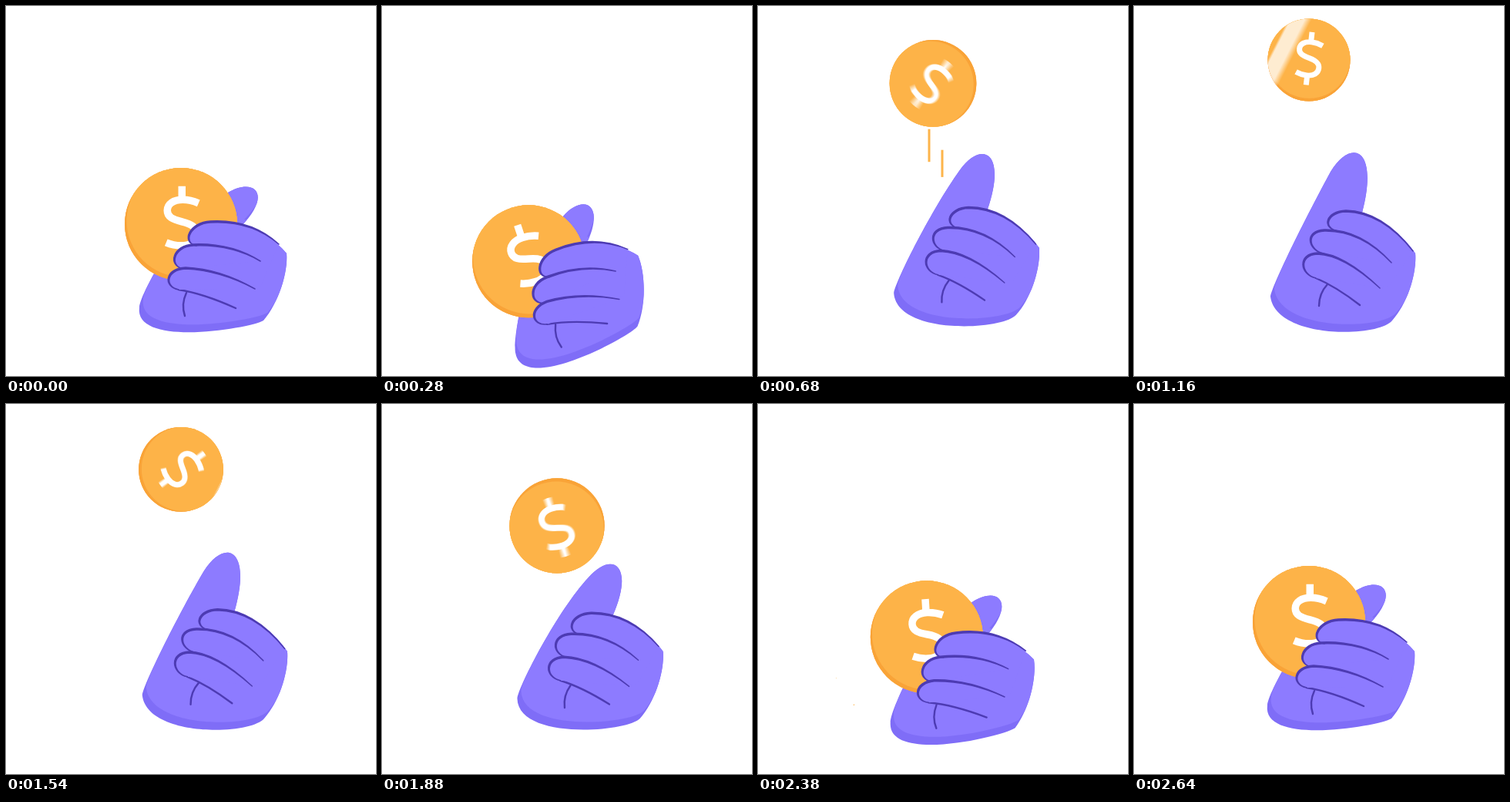
An HTML page for the animation above (2.66 s loop, 480x480 px).

```html
<!DOCTYPE html>
<html lang="en">
<head>
<meta charset="utf-8">
<title>Coin flip</title>
<style>
  html, body { margin: 0; width: 100%; height: 100%; overflow: hidden; background: #fff; }
  svg { display: block; width: 100vw; height: 100vh; }
</style>
</head>
<body>
<svg viewBox="0 0 480 480">
  <defs>
    <clipPath id="disc"><circle r="73"/></clipPath>
    <clipPath id="palm"><path id="outline"/></clipPath>
    <linearGradient id="shine">
      <stop offset="0" stop-color="#fff" stop-opacity="0"/>
      <stop offset=".12" stop-color="#fff" stop-opacity=".75"/>
      <stop offset=".7" stop-color="#fff" stop-opacity=".75"/>
      <stop offset="1" stop-color="#fff" stop-opacity="0"/>
    </linearGradient>
  </defs>
  <g id="trails" stroke="#fdb44b" stroke-width="3"></g>
  <g id="sparks" fill="#fdb44b"></g>
  <g id="back">
    <path id="shade" fill="#7f6df7"/>
    <g clip-path="url(#palm)"><path id="skin" fill="#8d7bff" transform="translate(5 -10)"/></g>
    <path id="crease" fill="none" stroke="#4d3bb3" stroke-width="2.4" stroke-linecap="round"/>
  </g>
  <g id="coin" ><g clip-path="url(#disc)">
    <g id="layers"></g>
    <rect id="glare" x="-21" y="-80" width="42" height="160" fill="url(#shine)"/>
  </g></g>
  <g id="front"></g>
</svg>
<script>
const LOOP = 2660, PEAK = 1120, PIVOT = [326, 415], HELD = [227, 283], R = 73;
const INK = '#4d3bb3', SKIN = '#8d7bff';
// Each half of the flight: length, total turn, and how the grip eases
const RISE = { span: 840, turn: -539, ease: 2.5, rest: 0 };
const FALL = { span: 1022, turn: 282, ease: 3.25, rest: 720 };
const $ = id => document.getElementById(id);

function set(el, attrs) {
  for (const k in attrs) el.setAttribute(k, attrs[k]);
}
function add(parent, tag, attrs) {
  const el = document.createElementNS('http://www.w3.org/2000/svg', tag);
  set(el, attrs);
  parent.appendChild(el);
  return el;
}
const lerp = (a, b, k) => a + (b - a) * k;
const ramp = (t, a, b) => Math.min(1, Math.max(0, (t - a) / (b - a)));
const smooth = (t, a, b) => { const u = ramp(t, a, b); return u * u * (3 - 2 * u); };
const bump = (t, a, top, b) => smooth(t, a, top) * (1 - smooth(t, top, b));

// Blend two path strings with matching commands
function morph(a, b) {
  const num = /-?[\d.]+/g, to = b.match(num).map(Number);
  return k => {
    let i = 0;
    return a.replace(num, n => lerp(+n, to[i++], k).toFixed(2));
  };
}

// A finger runs from its tuck round the tip to the knuckle, then bends to its end
function edge([ax, ay, bx, by, cx, cy, ex, ey], o = 0) {
  return `M${ax} ${ay}C${ax - 20 + o} ${ay - 4} ${bx - 26 + o} ${by + 1 + o} ${bx} ${by + o}Q${cx} ${cy + o} ${ex} ${ey}`;
}
// Thick at the tip, tapering to both ends
function taper(p) {
  const [ax, ay, bx, by, cx, cy] = p;
  return edge(p, -1) + `Q${cx} ${cy + 1} ${bx} ${by + 1}C${bx - 25} ${by + 2} ${ax - 19} ${ay - 4} ${ax} ${ay}Z`;
}

// Gripping pose, then open pose
const hand = morph(
  'M173 391C174 372 235 262 288 242C322 222 347 244 304 287C325 291 350 303 364 321C366 345 354 385 334 408C318 418 166 444 173 391Z',
  'M177 377C180 360 225 270 255 215C282 171 318 184 296 268C322 276 350 298 365 321C367 345 356 385 335 408C316 431 184 432 177 377Z');
const crease = morph(
  'M224 368Q256 373 298 392M234 372Q227 387 232 402',
  'M236 353Q262 364 293 388M251 361Q240 373 240 389');
const fingers = [
  [[247, 311, 265, 280, 318, 277, 354, 309], [264, 292, 275, 266, 322, 267, 362, 318]],
  [[230, 341, 243, 310, 292, 308, 330, 331], [246, 321, 247, 291, 294, 290, 334, 333]],
  [[224, 368, 233, 340, 278, 342, 323, 367], [236, 353, 238, 321, 272, 322, 319, 366]]
].map(([grip, open]) => ({ grip, open, fill: add($('front'), 'path', { fill: SKIN }) }));
for (const f of fingers)
  f.line = add($('front'), 'path', { fill: INK, stroke: INK, 'stroke-width': 1.5, 'stroke-linejoin': 'round' });

// Stacked opaque coins average into a rotational motion blur
const BLUR = 8, SHUTTER = 22;
const layers = Array.from({ length: BLUR }, (_, i) => {
  const g = add($('layers'), 'g', { opacity: 1 / (i + 1) });
  add(g, 'circle', { r: R + 1, fill: '#f9a43b' });
  const face = add(g, 'circle', { r: R, fill: '#fdb44b' });
  const sign = add(g, 'path', {
    d: 'M21.5-25Q11-29.5 1-29.5C-11-29.5-19-24-19-15.5S-12-4 0-1S19 6 19 15S11 30 -1 30Q-11 30-20.5 26M0-47V-30M0 30V47',
    fill: 'none', stroke: '#fff', 'stroke-width': 9.5
  });
  return { face, sign };
});

const sparks = [
  { x: 141.5, y: 376, size: 15, turn: -17 },
  { x: 122.8, y: 348, size: 9.5, turn: -35 }
].map(s => ({ ...s, el: add($('sparks'), 'path', { d: 'M0-1Q.28-.28 1 0Q.28.28 0 1Q-.28.28-1 0Q-.28-.28 0-1Z' }) }));

const trails = [
  { x: 222, gap: 3, length: 58 },
  { x: 239, gap: 30, length: 48 }
].map(l => ({ ...l, el: add($('trails'), 'line', { x1: l.x, x2: l.x }) }));

const half = t => t < PEAK ? RISE : FALL;
const fromPeak = t => Math.abs(t - PEAK) / half(t).span;
const flyY = t => 70 + 213 * fromPeak(t) ** 3;
const flyR = t => 53.5 + .092 * (flyY(t) - 70);
const holding = t => 1 - ramp(t, 305, 365) + ramp(t, 2080, 2150);
const spin = t => lerp(366 + half(t).turn * fromPeak(t) ** 2, half(t).rest, holding(t));

function drawHand(t, rot, dy) {
  const k = Math.max(0, 1 - fromPeak(t) ** half(t).ease);
  const transform = `translate(0 ${dy}) rotate(${rot} ${PIVOT})`;
  set($('back'), { transform });
  set($('front'), { transform });
  for (const id of ['outline', 'shade', 'skin']) set($(id), { d: hand(k) });
  set($('crease'), { d: crease(k) });
  fingers.forEach(({ grip, open, fill, line }, i) => {
    const p = grip.map((n, j) => lerp(n, open[j], k));
    set(line, { d: taper(p) });
    set(fill, { d: edge(p) + (i ? 'Z' : 'L330 365L240 345Z') });
  });
}

function drawCoin(t, rot, dy) {
  const grip = holding(t), a = rot * Math.PI / 180, c = Math.cos(a), s = Math.sin(a);
  const px = HELD[0] - PIVOT[0], py = HELD[1] - PIVOT[1];
  const x = lerp(HELD[0], PIVOT[0] + px * c - py * s, grip);
  const y = lerp(flyY(t), PIVOT[1] + px * s + py * c + dy, grip);
  set($('coin'), { transform: `translate(${x} ${y}) scale(${lerp(flyR(t), R, grip) / R})` });
  const rim = 30 - 37 * Math.max(0, 1 - fromPeak(t)) ** 4;
  layers.forEach(({ face, sign }, i) => {
    const turn = spin(t + (i / (BLUR - 1) - .5) * SHUTTER * (1 - grip)) + rot * grip;
    const tip = (turn + rim) * Math.PI / 180, ux = Math.sin(tip), uy = -Math.cos(tip);
    set(face, { transform: `translate(${5 * ux} ${5 * uy})` });
    set(sign, { transform: `translate(${2.5 * ux} ${2.5 * uy}) rotate(${turn})` });
  });
  set($('glare'), { transform: `translate(${(t - PEAK) * .4 - 69} 0) skewX(-27)` });
}

function drawExtras(t) {
  const long = bump(t, 420, 620, 800);
  for (const l of trails) {
    const y1 = flyY(t) + flyR(t) + l.gap;
    set(l.el, { y1, y2: y1 + l.length * long, visibility: long > .01 ? 'visible' : 'hidden' });
  }
  const size = bump(t, 2080, 2170, 2420);
  const far = 1.24 - .41 * (1 - ramp(t, 2080, 2420)) ** 2;
  for (const p of sparks) {
    set(p.el, {
      transform: `translate(${lerp(214, p.x, far)} ${lerp(315, p.y, far)}) rotate(${p.turn}) scale(${p.size * size})`,
      visibility: size > .01 ? 'visible' : 'hidden'
    });
  }
}

function draw(t) {
  const windup = bump(t, 0, 290, 400), landing = bump(t, 2050, 2175, LOOP - 20);
  const recoil = bump(t, 300, 560, 1160);
  const rot = -18.6 * windup - 6.2 * landing;
  const dy = 10 * windup + 21.8 * landing - 8 * recoil;
  drawHand(t, rot, dy);
  drawCoin(t, rot, dy);
  drawExtras(t);
}

const start = performance.now();
function tick() {
  draw((performance.now() - start) % LOOP);
  requestAnimationFrame(tick);
}
tick();
</script>
</body>
</html>
```
